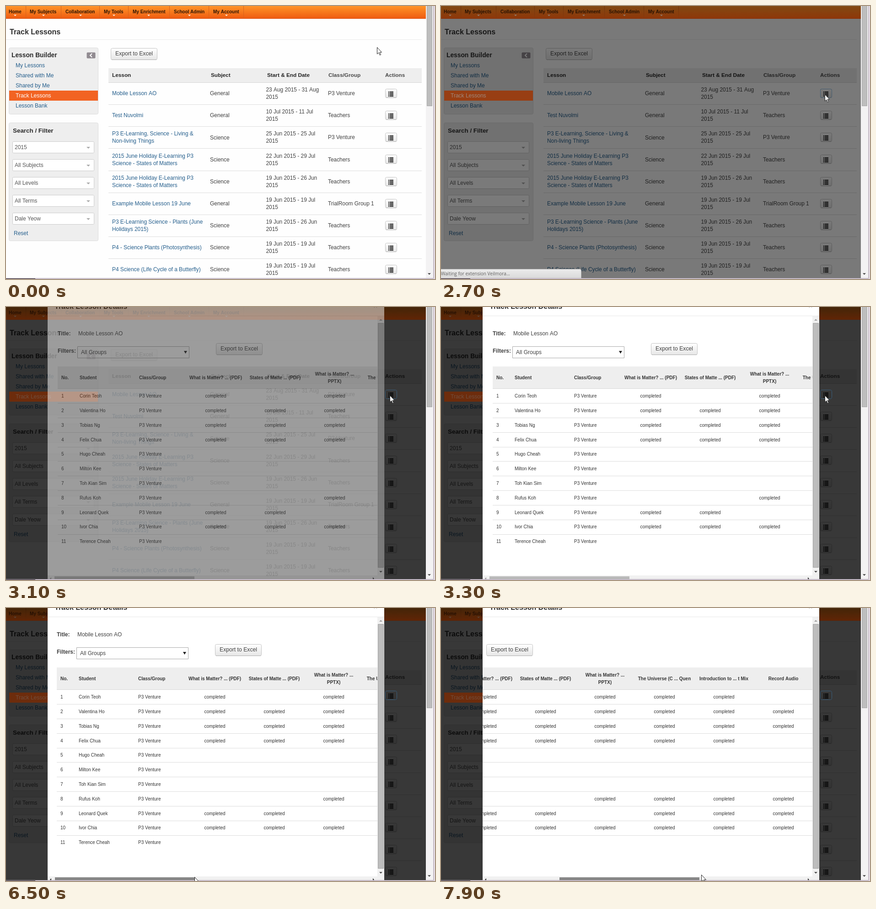
An HTML page with a canvas that plays this animation: 938 by 597 pixels, repeating every 8000 ms.

```html
<!DOCTYPE html>
<html lang="en">
<head>
<meta charset="utf-8">
<title>Track Lessons</title>
<style>
html, body { margin: 0; width: 100%; height: 100%; overflow: hidden; background: #fff; }
canvas { display: block; }
</style>
</head>
<body>
<canvas id="stage" width="938" height="597"></canvas>
<script>
const W = 938, H = 597, LOOP = 8000, STEP = 100;
const SANS = '"Liberation Sans", Arial, sans-serif';
const UI = '"Open Sans", "Noto Sans", sans-serif';
const LINK = '#245e8c', INK = '#404040', DARK = '#2a2a2a';

const screen = document.getElementById('stage').getContext('2d');
const layer = document.createElement('canvas');
layer.width = W;
layer.height = H;
const modalCtx = layer.getContext('2d');
let g = screen;

const NAV = [
  ['Home', 6, 20, 43], ['My Subjects', 52, 82, 120], ['Collaboration', 130, 163, 204],
  ['My Tools', 214, 236, 267], ['My Enrichment', 277, 312, 357],
  ['School Admin', 367, 401, 443], ['My Account', 453, 482, 519]
];
const MENU = ['My Lessons', 'Shared with Me', 'Shared by Me', 'Track Lessons', 'Lesson Bank'];
const FILTERS = ['2015', 'All Subjects', 'All Levels', 'All Terms', 'Dale Yeow'];
const LESSONS = [
  ['Mobile Lesson AO', 'General', '23 Aug 2015 - 31 Aug', 'P3 Venture'],
  ['Test Nuvolmi', 'General', '10 Jul 2015 - 11 Jul', 'Teachers'],
  ['P3 E-Learning, Science - Living &|Non-living Things', 'Science', '25 Jun 2015 - 25 Jul', 'P3 Venture'],
  ['2015 June Holiday E-Learning P3|Science - States of Matters', 'Science', '22 Jun 2015 - 29 Jul', 'Teachers'],
  ['2015 June Holiday E-Learning P3|Science - States of Matters', 'Science', '19 Jun 2015 - 26 Jun', 'Teachers'],
  ['Example Mobile Lesson 19 June', 'General', '19 Jun 2015 - 19 Jul', 'TrialRoom Group 1'],
  ['P3 E-Learning Science - Plants (June|Holidays 2015)', 'Science', '19 Jun 2015 - 26 Jun', 'Teachers'],
  ['P4 - Science Plants (Photosynthesis)', 'Science', '19 Jun 2015 - 19 Jul', 'Teachers'],
  ['P4 Science (Life Cycle of a Butterfly)', 'Science', '19 Jun 2015 - 19 Jul', 'Teachers']
];
const TASKS = [
  'What is Matter? ... (PDF)', 'States of Matte ... (PDF)', 'What is Matter? ...|PPTX)',
  'The Universe (C ... Quen', 'Introduction to ... t Mix', 'Record Audio'
];
// Each digit names a finished task column.
const STUDENTS = [
  ['Corin Teoh', '0234'], ['Valentina Ho', '012345'], ['Tobias Ng', '012345'],
  ['Felix Chua', '01234'], ['Hugo Cheah', ''], ['Milton Kee', ''], ['Toh Kian Sim', ''],
  ['Rufus Koh', '2345'], ['Leonard Quek', '01345'], ['Ivor Chia', '012345'], ['Terence Cheah', '']
];

// Cursor path: time, x, y
const PATH = [
  [700, 811, 90], [900, 815, 104], [1100, 828, 148], [1300, 839, 187], [1400, 842, 194],
  [2500, 842, 194], [2600, 839, 193], [3900, 839, 193], [4200, 795, 250], [4400, 702, 354],
  [4500, 650, 421], [4800, 585, 478], [5300, 480, 560], [5700, 411, 588],
  [6200, 411, 588], [6500, 412, 588], [7900, 569, 583]
];

const clamp = v => Math.max(0, Math.min(1, v));
const ramp = (t, a, b) => clamp((t - a) / (b - a));

function cursorAt(t) {
  const i = PATH.findIndex(p => p[0] > t);
  if (i === 0) return PATH[0].slice(1);
  if (i < 0) return PATH[PATH.length - 1].slice(1);
  const [a, b] = [PATH[i - 1], PATH[i]], k = ramp(t, a[0], b[0]);
  return [a[1] + (b[1] - a[1]) * k, a[2] + (b[2] - a[2]) * k];
}

function rect(x, y, w, h, fill) {
  g.fillStyle = fill;
  g.fillRect(x, y, w, h);
}

function box(x, y, w, h, r, fill, stroke) {
  g.beginPath();
  g.roundRect(x + 0.5, y + 0.5, w - 1, h - 1, r);
  g.fillStyle = fill;
  g.fill();
  if (stroke) {
    g.strokeStyle = stroke;
    g.lineWidth = 1;
    g.stroke();
  }
}

// y is the optical centre of the first line; "|" breaks lines around it.
function text(str, x, y, { size = 12, bold = false, color = INK, align = 'left', font = SANS } = {}) {
  g.font = `${bold ? 'bold ' : ''}${size}px ${font}`;
  g.fillStyle = color;
  g.textAlign = align;
  const lines = str.split('|');
  lines.forEach((s, i) =>
    g.fillText(s, x, Math.round(y + size * 0.35 + (i - (lines.length - 1) / 2) * 16)));
}

function poly(points, fill, stroke) {
  g.beginPath();
  points.forEach(([x, y]) => g.lineTo(x, y));
  g.closePath();
  g.fillStyle = fill;
  g.fill();
  if (stroke) {
    g.strokeStyle = stroke;
    g.lineWidth = 1;
    g.stroke();
  }
}

const down = (x, y, r, color) => poly([[x - r, y - r / 2], [x + r, y - r / 2], [x, y + r / 2]], color);
const up = (x, y, r, color) => poly([[x - r, y + r / 2], [x + r, y + r / 2], [x, y - r / 2]], color);

function vGrad(y0, y1, a, b) {
  const grad = g.createLinearGradient(0, y0, 0, y1);
  grad.addColorStop(0, a);
  grad.addColorStop(1, b);
  return grad;
}

function button(x, y, w, h) {
  box(x, y, w, h, 3, vGrad(y, y + h, '#ffffff', '#e6e6e6'), '#c4c4c4');
  rect(x + 2, y + h - 1, w - 4, 1, '#adadad');
}

function exportButton(x, y) {
  button(x, y, 102, 26);
  text('Export to Excel', x + 10, y + 12, { size: 12.2 });
}

function listButton(y) {
  button(829, y - 10, 26, 20);
  for (let i = 0; i < 4; i++) {
    rect(836, y - 4 + i * 3, 2, 2, '#222');
    rect(839, y - 4 + i * 3, 8, 2, '#222');
  }
}

function drawNav() {
  rect(0, 0, 918, 28, vGrad(0, 28, '#ff9428', '#ee5a10'));
  rect(0, 27, 918, 1, '#d9541a');
  for (const [label, x, mid, edge] of NAV) {
    text(label, x, 12, { size: 10, bold: true, color: '#2b1404' });
    down(mid, 20.5, 3, '#fff3e6');
    rect(edge, 0, 1, 27, '#d9641c');
  }
}

function drawSidebar() {
  box(6, 91, 196, 146, 3, '#eeeeee', '#dcdcdc');
  text('Lesson Builder', 12, 107, { size: 13.8, bold: true, color: DARK });
  box(176, 101, 20, 14, 2, '#918b91');
  g.beginPath();
  g.moveTo(188, 104);
  g.lineTo(184, 108);
  g.lineTo(188, 112);
  g.strokeStyle = '#fff';
  g.lineWidth = 2;
  g.stroke();
  MENU.forEach((label, i) => {
    const active = i === 3;
    if (active) rect(7, 185, 194, 22, '#f26322');
    text(label, 21, 130 + i * 21.9, { color: active ? '#fff' : LINK });
  });

  box(6, 255, 196, 259, 3, '#eeeeee', '#dcdcdc');
  text('Search / Filter', 15, 272, { size: 13.4, bold: true, color: DARK });
  FILTERS.forEach((label, i) => {
    const y = 296 + i * 39;
    box(14, y, 179, 26, 2, '#fff', '#cccccc');
    text(label, 19, y + 12.5, { color: '#555' });
    down(180, y + 14, 4, '#aaa');
  });
  text('Reset', 17, 497, { color: LINK });
}

function drawLessons(hover) {
  exportButton(229, 92);
  rect(224, 136, 685, 31, '#eeeeee');
  rect(224, 167, 685, 1, '#d6d6d6');
  [['Lesson', 232], ['Subject', 448], ['Start & End Date', 571], ['Class/Group', 705], ['Actions', 829]]
    .forEach(([label, x], i) => text(label, x, 150.5, { size: 11.8, bold: true, color: i < 3 ? '#222' : '#484848' }));
  LESSONS.forEach(([name, subject, date, group], i) => {
    const y = 191 + i * 48.15;
    if (hover && i === 0) rect(224, 168, 685, 47, '#f5f5f5');
    if (i) rect(224, Math.round(y - 24), 685, 1, '#dddddd');
    text(name, 232, y, { color: LINK, size: 11.9 });
    text(subject, 446, y);
    text(date + '|2015', 568.5, y, { size: 11.9 });
    text(group, 704, y, { size: 11.9 });
    listButton(Math.round(y));
  });
}

function drawPage(hover) {
  rect(0, 0, W, H, '#fefefe');
  drawNav();
  text('Track Lessons', 8, 56, { size: 16, bold: true, color: '#303030' });
  rect(0, 73, 909, 1, '#ebebeb');
  drawSidebar();
  drawLessons(hover);
}

function drawWindowEdge() {
  rect(918, 0, 15, 595, '#f3f2f3');
  box(920, -2, 12, 221, 0, '#bdbdbd', '#a9a9a9');
  down(925.5, 586, 3.5, '#444');
  rect(933, 0, 1, 596, '#ffffff');
  rect(934, 0, 1, 596, '#a79ca9');
  rect(935, 0, 3, H, '#e3dae2');
  rect(0, 595, 935, 1, '#b1a5b5');
  rect(0, 596, W, 1, '#dcd2de');
  rect(0, 596, 64, 1, '#2c2327');
}

// The orange areas keep a warm glow under the shade.
function drawShade(k) {
  rect(0, 0, 918, 595, `rgba(0,0,0,${0.78 * k})`);
  g.globalAlpha = k;
  g.globalCompositeOperation = 'lighter';
  rect(0, 0, 918, 28, vGrad(0, 28, 'rgb(12,5,0)', 'rgb(44,17,2)'));
  rect(7, 185, 194, 22, 'rgb(56,22,5)');
  g.globalCompositeOperation = 'source-over';
  g.beginPath();
  g.roundRect(829.5, 181.5, 25, 19, 3);
  g.strokeStyle = '#3b5f7c';
  g.lineWidth = 1;
  g.stroke();
  g.globalAlpha = 1;
}

function drawStatus() {
  box(-4, 575, 311, 24, 3, vGrad(575, 595, '#ececec', '#dadada'), '#b5b5b5');
  text('Waiting for extension Veilmora...', 0, 585, { size: 10, font: UI, color: '#606060' });
}

function drawDetails(row) {
  text('Title:', 113, 58, { bold: true });
  text('Mobile Lesson AO', 158, 58, { size: 11.9 });
  text('Filters:', 113, 96, { bold: true });
  box(156, 86, 245, 26, 0, '#fff', '#a9a9a9');
  text('All Groups', 164, 99);
  poly([[389, 96], [396, 96], [392.5, 102]], '#222');
  exportButton(459, 79);

  rect(113, 130, 1060, 48, '#eeeeee');
  rect(113, 178, 1060, 1, '#d8d8d8');
  const head = { size: 10, bold: true, color: '#333' };
  text('No.', 121, 154, head);
  text('Student', 161, 154, head);
  text('Class/Group', 291, 154, head);
  const mid = k => 458.5 + 130 * k;
  TASKS.forEach((label, k) => text(label, mid(k), 154, { ...head, align: 'center' }));
  STUDENTS.forEach(([name, done], i) => {
    const y = 194.6 + i * 31.82, small = { size: 10, color: '#333' };
    if (i === row) rect(113, Math.round(y - 15), 1060, 31, '#f2f5f4');
    if (i < 10) rect(113, Math.round(y + 15.6), 1060, 1, '#dddddd');
    text(String(i + 1), 121, y, small);
    text(name, 161, y, small);
    text('P3 Venture', 291, y, small);
    for (const k of done) text('completed', mid(+k), y, { ...small, align: 'center' });
  });
}

function drawModal(row, drag, vHover, hHover, pressed) {
  g.clearRect(0, 0, W, H);
  rect(91, 0, 736, 595, '#fff');
  text('Track Lesson Details', 106, -1.5, { size: 16, bold: true, color: '#303030' });
  text('×', 808, -2, { size: 15, bold: true, color: '#ccc', align: 'center' });
  rect(91, 19, 736, 1, '#e8e8e8');

  g.save();
  g.beginPath();
  g.rect(91, 20, 721, 567);
  g.clip();
  g.translate(-Math.round(drag * 2.353), 0);
  drawDetails(row);
  g.restore();

  rect(812, 20, 15, 575, '#f1f1f1');
  box(813, 35, 13, 535, 0, vHover ? '#a3a3a3' : '#bdbdbd', '#a3a3a3');
  up(819.5, 28, 3.5, '#9a9a9a');
  down(819.5, 579, 3.5, '#444');
  rect(91, 587, 721, 8, '#f1f1f1');
  rect(Math.round(106 + drag), 589, 306, 6, pressed ? '#878787' : hHover ? '#a3a3a3' : '#bababa');
  poly([[96, 594], [99, 591], [99, 597]], drag ? '#333' : '#9a9a9a');
  poly([[805, 594], [802, 591], [802, 597]], '#333');
}

function drawTooltip(alpha) {
  g.globalAlpha = alpha;
  g.shadowColor = 'rgba(0,0,0,.5)';
  g.shadowBlur = 3;
  g.shadowOffsetX = g.shadowOffsetY = 2;
  rect(840, 215, 71, 18, '#fbfbfb');
  g.shadowColor = 'transparent';
  box(839, 214, 73, 20, 1, '#fbfbfb', '#8c8c8c');
  text('Track details', 845, 224, { size: 10, font: UI, color: '#666' });
  g.globalAlpha = 1;
}

function drawArrow(x, y) {
  g.save();
  g.translate(x + 0.5, y + 0.5);
  poly([[0, 0], [0, 14.5], [3.4, 11.4], [5.8, 17], [8, 16], [5.6, 10.7], [10, 10.7]], '#fff', '#222');
  g.restore();
}

function drawHand(x, y) {
  g.save();
  g.translate(x - 1.5, y + 0.5);
  poly([[-1, 1], [0, 0], [1, 0], [2, 1], [2, 6], [4.5, 6], [5, 7], [7, 7], [7.5, 8], [9, 8.3],
    [9.5, 9.5], [9.5, 13], [8, 16], [8, 19], [0, 19], [-1.5, 15], [-4.5, 11], [-4.5, 9.5],
    [-3, 9.3], [-1, 11]], '#fff', '#222');
  g.beginPath();
  for (const fx of [2, 4.5, 7]) {
    g.moveTo(fx, 7);
    g.lineTo(fx, 10);
  }
  g.stroke();
  g.restore();
}

function modalRow([x, y]) {
  return x > 113 && x < 812 && y > 178 ? Math.floor((y - 178.7) / 31.82) : -1;
}

function render(t) {
  const [x, y] = cursorAt(t);
  const shade = ramp(t, 2500, 2800), fade = ramp(t, 2950, 3250);
  g = screen;
  drawPage(y > 167 && t < 2600);
  if (shade) drawShade(shade);
  if (t >= 2700 && t < 3000) drawStatus();
  if (fade) {
    const drag = t > 6200 ? cursorAt(t - 45)[0] - 411 : 0;
    g = modalCtx;
    drawModal(t >= 4000 ? modalRow(cursorAt(t - 100)) : -1, drag,
      t >= 4000 && x > 812 && x < 827, t >= 5700, t >= 5800);
    g = screen;
    g.globalAlpha = fade;
    g.drawImage(layer, 0, 0);
    g.globalAlpha = 1;
  }
  drawWindowEdge();
  if (t >= 1900 && t < 2600) drawTooltip(0.45 + 0.55 * ramp(t, 1900, 2200));
  if (y > 180 && t < 2600) drawHand(x, y);
  else drawArrow(Math.round(x), Math.round(y));
}

function tick() {
  const t = performance.now() % LOOP;
  render(Math.floor(t / STEP) * STEP);
  requestAnimationFrame(tick);
}
tick();
</script>
</body>
</html>
```
